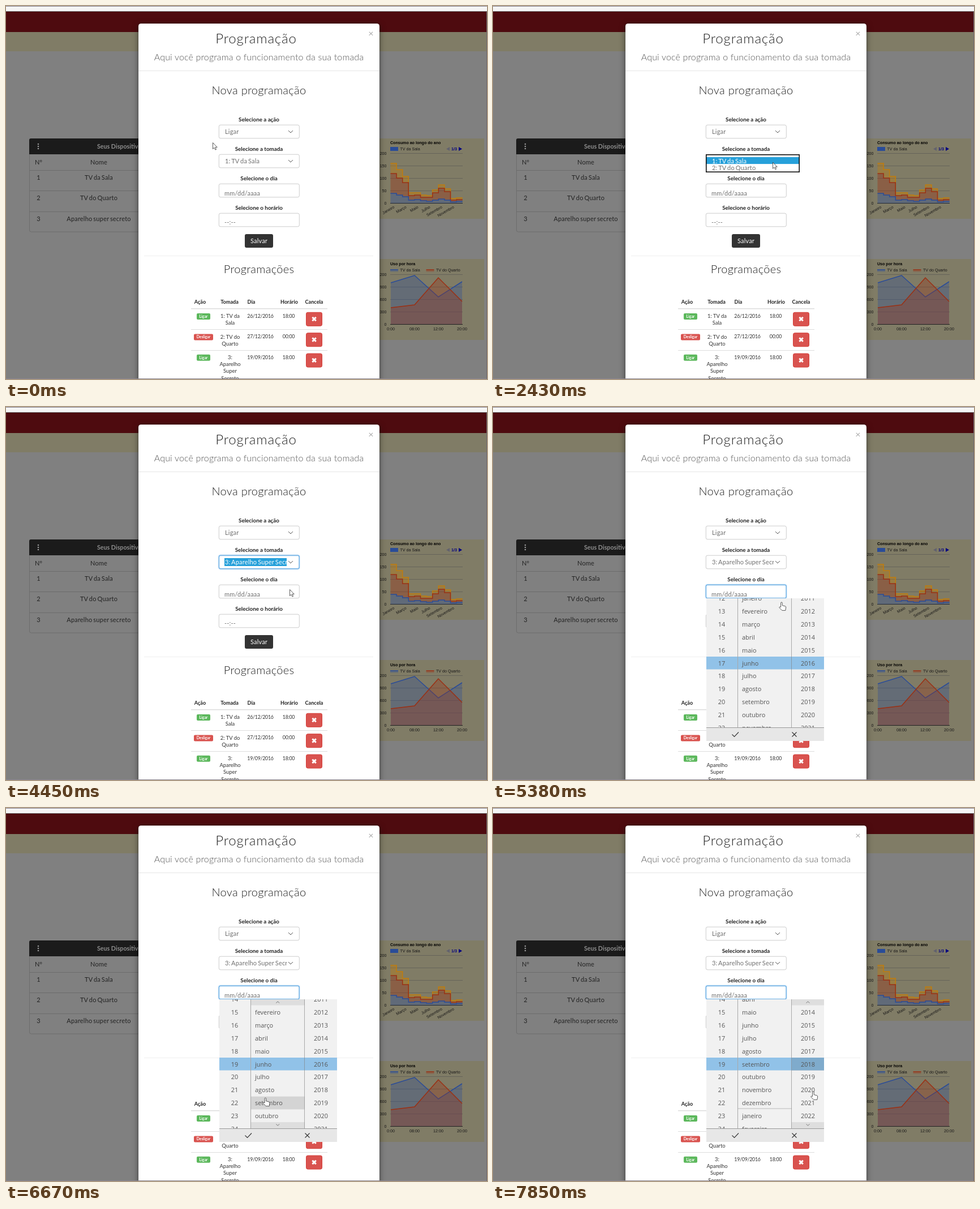
An HTML page for the animation above (8000 ms loop, 850x659 px).

```html
<!DOCTYPE html>
<html lang="pt-BR">
<head>
<meta charset="utf-8">
<title>Programação</title>
<style>
  html, body { margin: 0; width: 100%; height: 100%; overflow: hidden; background: #808080; }
  svg { display: block; }
  text { font: 400 11px Lato, "Open Sans", sans-serif; letter-spacing: .18px; word-spacing: -1px; fill: #707070; }
  .mid { text-anchor: middle; }
  .end { text-anchor: end; }
  .title { font-size: 24px; font-weight: 300; letter-spacing: .85px; fill: #222; }
  .sub { font-size: 16px; font-weight: 300; letter-spacing: .15px; word-spacing: 0; fill: #555; }
  .head { font-size: 20px; font-weight: 300; letter-spacing: .3px; word-spacing: 0; fill: #222; }
  .label { font-size: 9.8px; font-weight: 700; letter-spacing: 0; word-spacing: 0; fill: #222; }
  .th { font-size: 9.1px; font-weight: 700; letter-spacing: 0; fill: #222; }
  .td { font-size: 9.4px; letter-spacing: 0; word-spacing: 0; fill: #333; }
  .num { font-size: 8.8px; letter-spacing: -.25px; fill: #333; }
  .badge { font-size: 6.8px; font-weight: 700; letter-spacing: 0; fill: #fff; }
  .white { fill: #fff; }
  .dim { fill: #222; }
  .dimhead { font-size: 10.7px; font-weight: 700; letter-spacing: 0; word-spacing: 0; fill: #8e8e8e; }
  .close { font-size: 16px; fill: #aaa; letter-spacing: 0; }
  .chart { font: 7.1px "Liberation Sans", Arial, sans-serif; letter-spacing: 0; word-spacing: 0; fill: #181818; }
  .bold { font-weight: 700; fill: #000; }
  .pager { fill: #000080; }
  .pick { font: 10.9px "Open Sans", "Noto Sans", sans-serif; letter-spacing: 0; fill: #555; }
  .dialog { filter: drop-shadow(0 3.6px 5.3px rgba(0, 0, 0, .5)); }
  .glow { filter: drop-shadow(0 0 1px rgba(102, 175, 233, .6)); }
</style>
</head>
<body>
<svg id="stage" width="100%" height="100%" viewBox="0 0 850 659" xmlns="http://www.w3.org/2000/svg">
  <g id="page"></g>
  <g id="live"></g>
</svg>
<script>
const LOOP = 8000;
const page = document.getElementById('page');
const live = document.getElementById('live');

const text = (x, y, s, cls = '') => `<text x="${x}" y="${y}" class="${cls}">${s}</text>`;
const rect = (x, y, w, h, fill, more = '') =>
  `<rect x="${x}" y="${y}" width="${w}" height="${h}" fill="${fill}" ${more}/>`;
const path = (d, stroke, width = 1, fill = 'none') =>
  `<path d="${d}" stroke="${stroke}" stroke-width="${width}" fill="${fill}"/>`;
const hline = (x1, x2, y, color, width = 1) => path(`M${x1} ${y}H${x2}`, color, width);
const clip = (x, y, w, h, body) =>
  `<svg x="${x}" y="${y}" width="${w}" height="${h}" viewBox="${x} ${y} ${w} ${h}">${body}</svg>`;

// Page behind the dialog

const BLUE = '#2a4c98', RED = '#9a3014', ORANGE = '#c07c0c', BEIGE = '#807c66';

function deviceTable() {
  const names = ['TV da Sala', 'TV do Quarto', 'Aparelho super secreto'];
  return rect(41.5, 234.5, 300, 164.5, '#808080', 'stroke="#6c6c6c" rx="3"') +
    path('M41 262V237Q41 234 44 234H300V262Z', 'none', 0, '#1b1b1b') +
    [244, 248, 252].map(y => `<circle cx="57" cy="${y}" r="1.3" fill="#999"/>`).join('') +
    text(161, 252, 'Seus Dispositivos', 'dimhead') +
    text(57.5, 280, 'Nº', 'dim mid') + text(164, 280, 'Nome', 'dim mid') +
    names.map((name, i) => {
      const y = 290 + i * 36.3;
      return hline(42, 300, Math.round(y) + .5, '#6c6c6c') +
        text(57.5, y + 17, i + 1, 'dim mid') + text(164, y + 17, name, 'dim mid');
    }).join('');
}

function grid(top, labels) {
  return labels.map((label, i) => {
    const y = top + i * 22;
    return hline(679, 807, y + .5, i === 4 ? '#222' : '#66645a') + text(672.5, y + 3.2, label, 'chart end');
  }).join('');
}

function stairsChart() {
  const stepW = 10.6, left = 679.5;
  const tops = [
    [278, 289, 301, 330, 330, 334, 335, 325, 316, 323, 340, 339],
    [296, 304, 312, 335, 334, 338, 338, 330, 322, 328, 343, 342],
    [331, 334, 337, 343, 342, 344, 345, 343, 341, 343, 346, 345],
    Array(12).fill(348.5)
  ];
  const points = ys => ys.flatMap((y, i) =>
    [`${left + i * stepW} ${y}`, `${left + (i + 1) * stepW} ${y}`]);
  const series = [ORANGE, RED, BLUE].map((color, i) => {
    const upper = points(tops[i]), lower = points(tops[i + 1]).reverse();
    return `<path d="M${upper.concat(lower).join('L')}Z" fill="${color}" opacity=".38"/>` +
      path('M' + upper.join('L'), color, 1.5);
  }).join('');
  const months = ['Janeiro', 'Março', 'Maio', 'Julho', 'Setembro', 'Novembro'].map((m, i) =>
    `<g transform="translate(${687 + i * 21.1} 356.5) rotate(-30)">${text(0, 0, m, 'chart end')}</g>`).join('');
  return rect(640, 234, 205, 142, BEIGE) +
    text(679, 243.5, 'Consumo ao longo do ano', 'chart bold') +
    rect(679, 249, 14, 7, BLUE) + text(696.5, 255, 'TV da Sala', 'chart') +
    path('M784 249V256L778 252.5Z', 'none', 0, '#62626e') +
    text(792, 255, '1/3', 'chart bold pager mid') +
    path('M800 249V256L806 252.5Z', 'none', 0, '#000080') +
    grid(260, [200, 150, 100, 50, 0]) + series + months;
}

function lineChart() {
  const area = (ys, color) => {
    const d = 'M' + ys.map((y, i) => `${680 + i * 42} ${y}`).join('L');
    return `<path d="${d}V562H680Z" fill="${color}" opacity=".32"/>` + path(d, color, 1.5);
  };
  const key = (x, color, name) => `<rect x="${x}" y="466" width="14" height="3.5" fill="${color}" opacity=".32"/>` +
    hline(x, x + 14, 466, color, 1.5) + text(x + 17.5, 469, name, 'chart');
  return rect(640, 447, 205, 143, BEIGE) +
    text(679, 457.5, 'Uso por hora', 'chart bold') +
    key(679, BLUE, 'TV da Sala') + key(742.5, RED, 'TV do Quarto') +
    grid(474, [1200, 900, 600, 300, 0]) +
    area([489, 476, 514, 487], BLUE) + area([533, 528, 480, 522], RED) +
    ['0:00', '08:00', '12:00', '20:00'].map((s, i) => text(680 + i * 42, 573, s, 'chart mid')).join('');
}

// Dialog

const field = y => rect(376.3, y + .2, 142, 23.6, '#fff', 'stroke="#ccc" rx="2.8"');
const chevron = y => path(`M499 ${y + 10}L503 ${y + 14}L507 ${y + 10}`, '#555');

function scheduleTable() {
  const rows = [
    ['Ligar', ['1: TV da', 'Sala'], '26/12/2016', '18:00'],
    ['Desligar', ['2: TV do', 'Quarto'], '27/12/2016', '00:00'],
    ['Ligar', ['3:', 'Aparelho', 'Super', 'Secreto'], '19/09/2016', '18:00']
  ];
  const heads = { 'Ação': 343, Tomada: 395, Dia: 433.5, 'Horário': 500.5, Cancela: 544.5 };
  return Object.entries(heads).map(([name, x]) => text(x, 526, name, 'th mid')).join('') +
    hline(327, 568, 534.7, '#ddd', 1.5) +
    rows.map(([action, socket, day, hour], i) => {
      const y = 535 + i * 36.4, on = action === 'Ligar', w = on ? 24 : 34;
      return (i ? hline(327, 568, Math.round(y) + .5, '#ddd') : '') +
        rect(349 - w / 2, y + 8, w, 11, on ? '#5cb85c' : '#d9534f', 'rx="2"') +
        text(349, y + 16, action, 'badge mid') +
        socket.map((s, k) => text(396, y + 16.2 + k * 12.2, s, 'td mid')).join('') +
        text(449.5, y + 16, day, 'num mid') + text(499.5, y + 16, hour, 'num mid') +
        rect(530.5, y + 6.3, 28, 24, '#d9534f', 'stroke="#d43f3a" rx="2.8"') +
        path(`M541.4 ${y + 14.9}l6.400 6.400m0 -6.400l-6.400 6.400`, '#fff', 3);
    }).join('');
}

function dialog() {
  const labels = ['a ação', 'a tomada', 'o dia', 'o horário'];
  return rect(234, 31, 426, 660, '#fff', 'rx="4.5" class="dialog"') +
    rect(233.7, 30.7, 426.6, 660, 'none', 'rx="4.5" stroke="#000" stroke-width=".7" opacity=".25"') +
    text(442, 65.5, 'Programação', 'title mid') +
    text(447, 96, 'Aqui você programa o funcionamento da sua tomada', 'sub mid') +
    text(645, 54, '×', 'close mid') + hline(234, 660, 114.5, '#e5e5e5') +
    text(447, 156, 'Nova programação', 'head mid') +
    labels.map((s, i) => text(447, 203.5 + i * 52, 'Selecione ' + s, 'label mid') + field(210 + i * 52)).join('') +
    chevron(210) + chevron(262) +
    text(386, 335, 'mm/dd/aaaa') + text(386, 386, '--:--') +
    rect(422, 403, 50, 24, '#333', 'rx="3"') + text(447, 419, 'Salvar', 'white mid') +
    hline(244, 649, 441.5, '#eee') +
    text(447, 472, 'Programações', 'head mid') + scheduleTable();
}

page.innerHTML = rect(0, 0, 850, 659, '#808080') +
  rect(0, 0, 850, 9, '#f5f5f5') + rect(0, 0, 850, 1, '#8a8490') + rect(0, 9, 850, 1, '#777') +
  rect(0, 10, 850, 36, '#4e0b0f') + rect(0, 46, 850, 34, BEIGE) +
  deviceTable() + stairsChart() + lineChart() + dialog() +
  rect(0, 658, 850, 1, '#8a8490') + rect(849, 9, 1, 650, '#6a646c');

// Moving parts

// Bursts of screen updates: start, end, count
const bursts = [[0, 0, 1], [140, 140, 1], [620, 770, 2], [1040, 1320, 3], [1730, 2150, 4], [2430, 3410, 8],
  [3550, 4570, 9], [4690, 5650, 8], [5770, 6790, 9], [6920, 7850, 8]];
const ticks = bursts.flatMap(([a, b, n]) =>
  Array.from({ length: n }, (_, i) => Math.round(a + (n > 1 ? (b - a) * i / (n - 1) : 0))));

// Pointer keys: time, x, y
const route = [[0, 365, 241], [140, 389, 237], [480, 389, 237], [770, 501, 212], [1040, 501, 216],
  [1320, 499, 226], [1730, 499, 228], [2150, 494, 275], [2570, 494, 276], [2990, 490, 294],
  [3810, 491, 297], [4320, 501, 322], [4690, 501, 322], [4960, 504, 330], [5370, 510, 345],
  [5650, 510, 346], [6025, 404, 495], [6290, 404, 497], [6535, 458, 512], [7050, 460, 513],
  [7320, 560, 500], [7850, 566, 501]];

const ramp = (t, a, b, top) => top * Math.min(1, Math.max(0, (t - a) / (b - a)));

function pointerAt(t) {
  const i = route.findLastIndex(k => k[0] <= t);
  const [a, x, y] = route[i], [b, x2, y2] = route[i + 1] || [LOOP, x, y];
  const p = (t - a) / (b - a);
  return [x + (x2 - x) * p, y + (y2 - y) * p];
}

function pointer(x, y, hand) {
  const d = hand
    ? 'M-1.4 8.6V1.2a1.3 1.3 0 0 1 2.6 0V5.6L6.3 6.9q1.6.5 1.4 2.1L6.8 14.4H.8L-4 9.6q-.3-1.9 1.4-1.4z'
    : 'M.5 .5V11.600L3 9.300 4.900 13.100 6.600 12.300 4.800 8.600H8.200Z';
  return `<g transform="translate(${x} ${y})">${path(d, '#333', .8, '#fff')}</g>`;
}

const glow = y => rect(376.3, y + .2, 142, 23.6, 'none', 'stroke="#66afe9" stroke-width="1.2" rx="2.8" class="glow"');

function selectValue(y, value, marked) {
  return clip(386, y, 110, 24, (marked ? rect(386, y + 5, 110, 14, '#26a0da') : '') +
    text(387, y + 16, value, marked ? 'white' : ''));
}

function dropdown(y, w, h, options, py) {
  const pitch = 12.3;
  const hover = Math.floor((py - y - 5) / pitch);
  const rows = options.map((s, i) => {
    const top = y + 5 + i * pitch;
    const fill = i === 0 ? '#26a0da' : i === hover ? '#dcdcdc' : '#fff';
    return rect(376, top, w, pitch, fill) + text(387, top + 11, s, i ? '' : 'white');
  }).join('');
  return clip(376, y, w, h, rect(376, y, w, h, '#fff') + rows) +
    rect(376.8, y + .8, w - 1.6, h - 1.6, 'none', 'stroke="#111" stroke-width="1.6"');
}

const months = ['janeiro', 'fevereiro', 'março', 'abril', 'maio', 'junho', 'julho', 'agosto',
  'setembro', 'outubro', 'novembro', 'dezembro'];
const ROW = 22.85, MID = 452.5;

const columns = [
  { x: 377, w: 55, tx: 404, cls: 'pick mid', item: n => 17 + n, shift: t => ramp(t, 6030, 6275, 2) },
  { x: 433, w: 94.5, tx: 440, cls: 'pick', item: n => months[(n + 17) % 12], shift: t => ramp(t, 6670, 7050, 3) },
  { x: 528, w: 57, tx: 556.5, cls: 'pick mid', item: n => 2016 + n, shift: t => ramp(t, 7590, 7840, 2) }
];

function column(col, t, px, py) {
  const { x, w, tx, cls, item } = col;
  const off = col.shift(t), base = Math.round(off);
  let out = rect(x, 441, w, 22.5, '#91c2e8');
  const over = t > 5700 && px >= x && px < x + w;
  if (over) {
    const row = Math.round((py - MID) / ROW) - off;
    out += rect(x, MID + (row - .5) * ROW, w, ROW, '#000', 'opacity=".12"');
  }
  for (let n = base - 6; n <= base + 6; n++) {
    const y = MID + (n - off) * ROW;
    out += text(tx, y + 4, item(n), cls);
    if (item(n) === 'dezembro') out += hline(x, x + w, y + 10, '#bbb');
  }
  if (over) {
    const c = x + w / 2;
    out += rect(x, 338, w, 10.5, '#dedede') + rect(x, 555, w, 11, '#dedede') +
      path(`M${c - 3} 344.5l3 -2.6l3 2.6M${c - 3} 558.5l3 2.6l3 -2.6`, '#777');
  }
  return out;
}

function datePicker(t, px, py) {
  const h = t < 4950 ? 160 : 252;
  const body = rect(377, 338, 208, 252, '#f1f1f1') +
    clip(377, 338, 208, 228, columns.map(c => column(c, t, px, py)).join('') +
      path('M432.5 338V566M527.5 338V566', 'rgba(0,0,0,.3)')) +
    rect(377, 566, 208, 24, '#e7e7e7') + hline(377, 585, 566.5, '#999') +
    path('M422.5 578.5l4 4l7.5 -8M528.5 574.5l8 8m0 -8l-8 8', '#333', 1.1);
  return clip(377, 338, 208, h, body);
}

function scene(t) {
  const [px, py] = pointerAt(t);
  const options = ['1: TV da Sala', '2: TV do Quarto', '3: Aparelho Super Secreto'];
  const chosen = t >= 3800;
  const firstOpen = t >= 1040 && t < 1730, secondOpen = t >= 2430 && t < 3800;
  const firstFocus = t >= 1040 && t < 2430, secondFocus = chosen && t < 4690;

  let out = (firstFocus ? glow(210) : '') + (secondFocus ? glow(262) : '') +
    selectValue(210, 'Ligar', firstFocus) +
    selectValue(262, chosen ? options[2] : options[0], secondFocus);
  if (firstOpen) out += dropdown(210, 143, t < 1180 ? 24 : 36, ['Ligar', 'Desligar'], py);
  if (secondOpen) out += dropdown(262, 166, t < 2560 ? 32 : 48, options, py);
  if (t >= 4690) out += glow(314);
  if (t >= 4820) out += datePicker(t, px, py);
  return out + pointer(px, py, t >= 5090);
}

let shown = -1;
const start = performance.now();
function frame() {
  const t = (performance.now() - start) % LOOP;
  const tick = ticks.findLast(k => k <= t) ?? 0;
  if (tick !== shown) {
    shown = tick;
    live.innerHTML = scene(tick);
  }
  requestAnimationFrame(frame);
}
frame();
</script>
</body>
</html>
```
